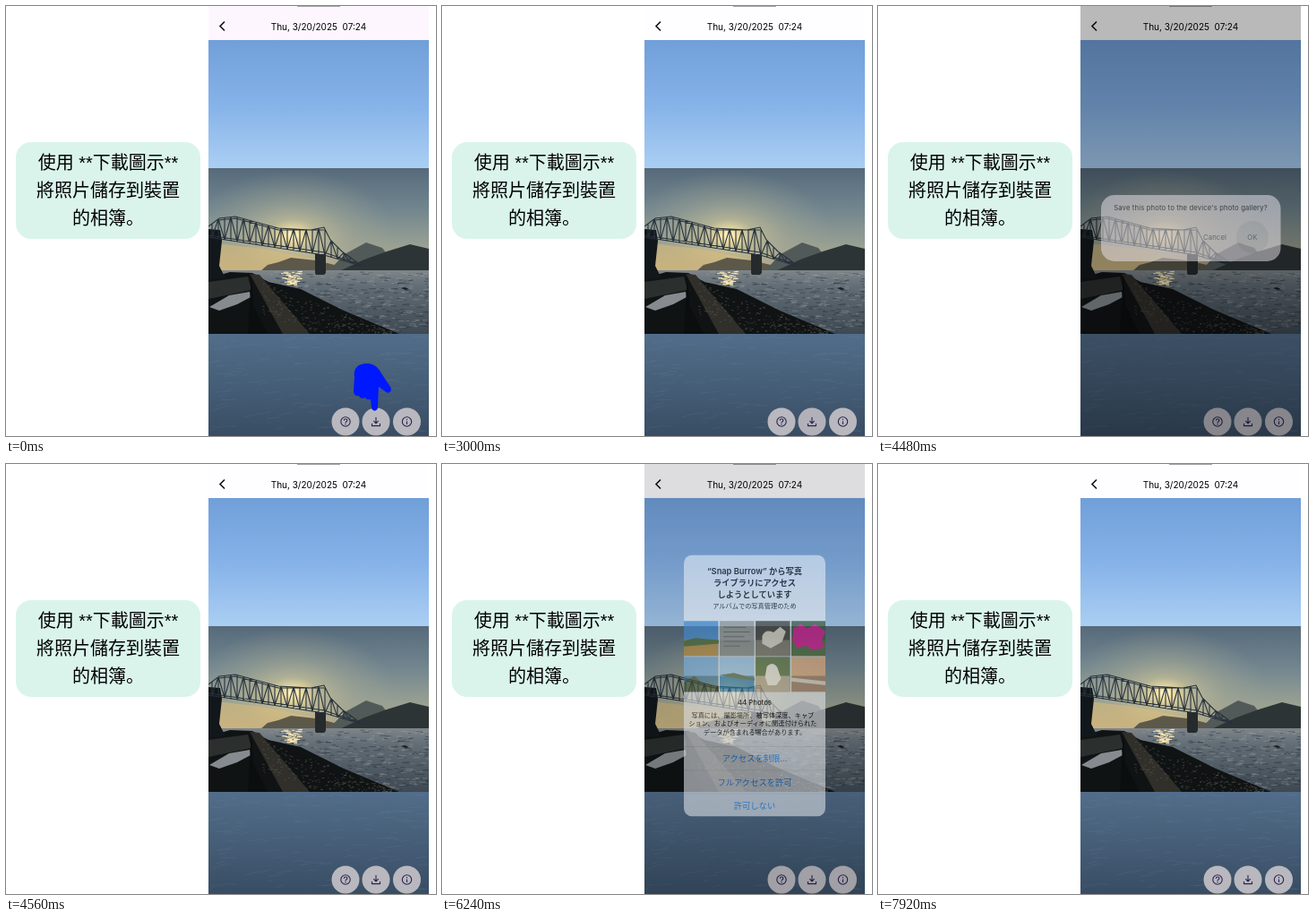
An HTML page that plays this animation: 480x480 px, repeating every 8000 ms.

```html
<!DOCTYPE html>
<html lang="ja">
<head>
<meta charset="utf-8">
<style>
html, body { margin: 0; width: 100%; height: 100%; overflow: hidden; background: #fff; }
svg { display: block; width: 100vw; height: 100vh; font-family: Inter, "Noto Sans CJK JP", sans-serif; }
text { white-space: pre; text-anchor: middle; }
.note { font: 500 20px "Liberation Sans", "Noto Sans CJK JP", "Noto Sans CJK", sans-serif; }
.ui { font-size: 7.7px; letter-spacing: .14px; }
.title { font-size: 8.8px; font-weight: 600; }
.small { font-size: 6.85px; }
.link { font-size: 8.8px; fill: #1680f2; }
</style>
</head>
<body>
<svg viewBox="0 0 480 480">
  <defs>
    <linearGradient id="sky" x2="0" y2="1"><stop stop-color="#719fd9"/><stop offset=".5" stop-color="#85b2e8"/><stop offset="1" stop-color="#abcff3"/></linearGradient>
    <linearGradient id="dusk" x2="0" y2="1"><stop stop-color="#566a7b"/><stop offset=".4" stop-color="#72868f"/><stop offset=".75" stop-color="#98a093"/><stop offset="1" stop-color="#bba984"/></linearGradient>
    <radialGradient id="sun"><stop stop-color="#fffbd8"/><stop offset=".07" stop-color="#f6e3a4"/><stop offset=".25" stop-color="#d3c898" stop-opacity=".6"/><stop offset=".6" stop-color="#a9ab94" stop-opacity=".4"/><stop offset="1" stop-color="#a0a594" stop-opacity="0"/></radialGradient>
    <linearGradient id="sea" x2="0" y2="1"><stop stop-color="#7f868a"/><stop offset=".25" stop-color="#626d76"/><stop offset="1" stop-color="#3d4852"/></linearGradient>
    <linearGradient id="deep" x2="0" y2="1"><stop stop-color="#526d8a"/><stop offset=".4" stop-color="#48617b"/><stop offset="1" stop-color="#384d63"/></linearGradient>
    <linearGradient id="sheet" x2="0" y2="1"><stop stop-color="#dce7f4"/><stop offset=".25" stop-color="#e4e8ed"/><stop offset=".6" stop-color="#d8dadd"/><stop offset="1" stop-color="#cfd5dc"/></linearGradient>
    <clipPath id="screen"><path d="M226 0h246v480H226z"/></clipPath>
    <clipPath id="photo"><path d="M226 181h246v185H226z"/></clipPath>
    <clipPath id="round"><rect x="274" y="109" width="150" height="277" rx="9"/></clipPath>
  </defs>

  <rect x="11" y="152" width="206" height="108" rx="17" fill="#daf4ec"/>
  <g class="note">
    <text x="114" y="182">使用 **下載圖示**</text>
    <text x="114" y="213">將照片儲存到裝置</text>
    <text x="114" y="244">的相簿。</text>
  </g>

  <g clip-path="url(#screen)">
    <path id="bar" d="M226 0h246v38H226z"/>
    <path d="M325 0h48v1h-48z" fill="#a5a2a6"/>
    <path d="M244 17.5l-5 5 5 5" fill="none" stroke="#111" stroke-width="1.6"/>
    <text x="349" y="27" font-size="10">Thu, 3/20/2025  07:24</text>
    <path d="M226 38h246v143H226z" fill="url(#sky)"/>
    <path d="M226 366h246v114H226z" fill="url(#deep)"/>
    <path id="streaks" stroke="#8ba4ba" stroke-opacity=".13" stroke-width=".8"/>

    <g clip-path="url(#photo)">
      <path d="M226 181h246v115H226z" fill="url(#dusk)"/>
      <ellipse cx="320" cy="256" rx="115" ry="72" fill="url(#sun)"/>
      <path d="M226 264l60 7 60 12v13H226z" fill="#e0bd77" opacity=".5"/>
      <path d="M284 296l8-7 12-3 14-5 28 3 50 12z" fill="#5c594a"/>
      <path d="M360 296l18-19 24-13 18 6 20 26z" fill="#525a59"/>
      <path d="M372 296l28-13 25-9 26-8 21 5v25z" fill="#2d3435"/>
      <path d="M226 295h246v71H226z" fill="url(#sea)"/>
      <path id="swell" stroke="#29323a" stroke-opacity=".55" stroke-width=".9"/>
      <path id="waves" stroke="#b4b8b4" stroke-opacity=".45" stroke-width=".7"/>
      <path id="glint" stroke="#ffe9ae" stroke-width="1"/>
      <path d="M441 315l4-1 5 2-4 1z" fill="#171c20"/>
      <path d="M226 304l24-7 25 1 18 10 36 8 48 24 62 26H226z" fill="#101314"/>
      <path d="M226 308l44-6 4 15-48 10z" fill="#2b2f2d"/>
      <path d="M227 336l22-13 23-4 1 6-15 8-20 7z" fill="#858b8e"/>
      <path d="M272 299l11 1 56 66h-30z" fill="#302f2a"/>
      <path d="M274 300l2 34 16 32h-22z" fill="#0b0e0f"/>
      <path id="rocks" stroke="#69685c" stroke-opacity=".45" stroke-width="1"/>
      <path d="M226 249l13 1 2 12-3 28 7 14-19 1z" fill="#12171b"/>
      <path d="M345 277h12v21l-2 2h-9l-1-2z" fill="#252a2c"/>
      <path id="truss" fill="none" stroke="#27323c" stroke-width="1.1"/>
    </g>

    <g id="buttons" fill="none" stroke="#2c2450" stroke-width="1.1">
      <g fill="#b9b8bf" stroke="none"><circle cx="379" cy="464" r="15.5"/><circle cx="413" cy="464" r="15.5"/><circle cx="447.5" cy="464" r="15.5"/></g>
      <circle id="tap" cx="413" cy="464" r="15.5" fill="#2c2450" stroke="none"/>
      <circle cx="379" cy="464" r="5.2"/><circle cx="447.5" cy="464" r="5.2"/>
      <path d="M377.3 462.8q0-1.8 1.8-1.8t1.8 1.6q0 1-1 1.5-.9.5-.9 1.4m0 .8v1.1M447.5 461v1.3m0 1.2v3.4M413 459v7m-2.7-2.8l2.7 2.8 2.7-2.8m-7.2 2.8v2.6h9v-2.6"/>
    </g>
    <path id="hand" fill="#0018ff" d="M389 414C387 404 394 399 403 399C411 399 416 404 419 410L429 425C432 430 427 434 423 430L416 425L415 448C415 453 408 453 408 448L407 439C404 440 402 439 401 437C398 439 395 438 394 435C390 436 388 433 388 429Z"/>

    <path id="dim" d="M226 0h246v480H226z"/>

    <g id="save">
      <rect x="249" y="211" width="200.5" height="74" rx="15" fill="#ece6ee"/>
      <circle id="ok" cx="418" cy="258" fill="#60758a"/>
      <g class="ui" fill="#1d1b20">
        <text x="349" y="228">Save this photo to the device's photo gallery?</text>
        <g fill="#456178"><text x="376" y="261">Cancel</text><text x="418" y="261">OK</text></g>
      </g>
    </g>

    <g id="access">
      <g clip-path="url(#round)">
        <path d="M274 109h150v277H274z" fill="url(#sheet)"/>
        <path id="press" d="M274 312h150v25H274z" fill="#a9b6bb"/>
        <g id="thumbs"></g>
        <path d="M274 312h150M274 337h150M274 362h150" stroke="#b4babf" stroke-width=".5"/>
      </g>
      <g class="title">
        <text x="349" y="129">“Snap Burrow” から写真</text>
        <text x="349" y="141.5">ライブラリにアクセス</text>
        <text x="349" y="154">しようとしています</text>
      </g>
      <g class="small">
        <text x="349" y="165">アルバムでの写真管理のため</text>
        <text x="349" y="268" font-size="7.4" font-weight="500">44 Photos</text>
        <text x="347" y="281">写真には、撮影場所、被写体深度、キャプ</text>
        <text x="347" y="290">ション、およびオーディオに関連付けられた</text>
        <text x="349" y="299">データが含まれる場合があります。</text>
      </g>
      <g class="link">
        <text x="349" y="328">アクセスを制限...</text>
        <text x="349" y="353">フルアクセスを許可</text>
        <text x="349" y="378">許可しない</text>
      </g>
    </g>
  </g>
</svg>
<script>
const $ = id => document.getElementById(id);
const set = (id, attrs) => { for (const k in attrs) $(id).setAttribute(k, attrs[k]); };

let seed = 7;
const rnd = (a, b) => a + (b - a) * ((seed = seed * 16807 % 2147483647) / 2147483647);
const dashes = (n, make) => Array.from({ length: n }, () => {
  const [x, y, dx, dy] = make();
  return `M${x} ${y}l${dx} ${dy}`;
}).join('');

const ripple = () => [rnd(285, 472), rnd(297, 364), rnd(2, 8), rnd(-.5, .5)];
set('waves', { d: dashes(190, ripple) });
set('swell', { d: dashes(260, ripple) });
set('glint', { d: dashes(55, () => {
  const y = rnd(296, 312), w = 15 - (y - 296) * .5;
  return [319 + rnd(-w, w - 4), y, rnd(2, 6), 0];
}) });
set('rocks', { d: dashes(210, () => {
  const x = rnd(286, 430), top = 309 + (x - 286) * .38;
  return [x, rnd(top, Math.min(366, top + 35)), rnd(1, 3), rnd(-1, 1)];
}) });
set('streaks', { d: dashes(110, () => [rnd(226, 465), rnd(368, 478), rnd(6, 20), rnd(-3, 1)]) });

// Bridge: a curved upper chord braced against the deck
const along = points => x => {
  const i = points.findIndex(p => p[0] >= x), [x1, y1] = points[i], [x0, y0] = points[i - 1];
  return y0 + (y1 - y0) * (x - x0) / (x1 - x0);
};
const chord = [[226, 246], [238, 237], [256, 235], [304, 248], [340, 250], [355, 247], [362, 261], [375, 274], [396, 289]];
const deck = [[226, 258], [355, 278], [396, 290]];
const topAt = along(chord), deckAt = along(deck);
let truss = `M${chord.join('L')}M${deck.join('L')}M226 256L355 275L396 289M238 239L256 237L304 250L355 250`;
for (let x = 230, up = 0; x < 388; x += 7, up ^= 1) {
  const from = up ? topAt : deckAt, to = up ? deckAt : topAt;
  truss += `M${x} ${topAt(x)}V${deckAt(x)}M${x} ${from(x)}L${x + 7} ${to(x + 7)}`;
}
set('truss', { d: truss });

// Thumbnails: sky, ground and one detail path each
const thumbs = [
  ['#438bd0', '#b88a38', 'M0 21l12-3 25 2v4l-37 3z', '#47672f'],
  ['#9a9b94', '#898c87', 'M4 6h24v1H4zM4 11h28v1H4zM4 16h22v1H4zM4 21h28v1H4zM4 26h18v1H4z', '#5d625f'],
  ['#3e3a2f', '#777061', 'M7 16q3-8 12-4l7-6 6 5-4 11-12 7-9-5z', '#e3d8c4'],
  ['#315331', '#45612d', 'M2 8l8-5 7 5 8-5 11 8-4 9 3 8-12 3-8-5-9 3-5-9z', '#d50c87'],
  ['#78afe0', '#447799', 'M0 27l11-7 8 7 18 4v6H0z', '#42533c'],
  ['#9cc8ee', '#347dac', 'M0 19l15-2 22 6v2l-24-3z', '#54694e'],
  ['#59713c', '#b5a58c', 'M12 10q6-6 11 1l4 12-5 7h-9l-3-9z', '#eeeadc'],
  ['#dfa878', '#9a765b', 'M0 22l37 4v4L0 26z', '#d9cab9']
];
$('thumbs').innerHTML = thumbs.map(([sky, ground, d, ink], i) =>
  `<g transform="translate(${274 + i % 4 * 38} ${i < 4 ? 179 : 217})"><path d="M0 0h36.5v37H0z" fill="${sky}"/>
  <path d="M0 20h36.5v17H0z" fill="${ground}"/><path d="${d}" fill="${ink}"/></g>`).join('');

const ramp = (t, a, b) => Math.min(1, Math.max(0, (t - a) / (b - a)));
const easeOut = k => 1 - (1 - k) ** 2;
const smooth = k => k * k * (3 - 2 * k);

function draw(now) {
  const t = Math.floor(now % 8000 / 40) * 40;
  set('bar', { fill: t < 1400 ? '#fdf6ff' : '#fefdff' });

  const leave = ramp(t, 480, 1320), grow = 1 + .2 * leave;
  set('hand', { opacity: 1 - leave, transform: `translate(409.5 426) scale(${grow}) translate(-409.5 -426)` });
  set('tap', { opacity: .14 * ramp(t, 2960, 3080) * (1 - ramp(t, 3200, 3400)) });

  const save = easeOut(ramp(t, 3160, 3440)) * (1 - ramp(t, 4400, 4560));
  set('save', { opacity: save });
  set('ok', { r: 18 * ramp(t, 4280, 4440), opacity: .14 });

  const enter = easeOut(ramp(t, 6080, 6480)), access = enter * (1 - smooth(ramp(t, 7480, 7920)));
  const size = 1.15 - .15 * enter;
  set('access', { opacity: access, transform: `translate(349 247.5) scale(${size}) translate(-349 -247.5)` });
  set('press', { opacity: t >= 7400 ? .6 : 0 });
  set('dim', { opacity: .54 * save + .2 * access });
  requestAnimationFrame(draw);
}
draw(performance.now());
</script>
</body>
</html>
```
